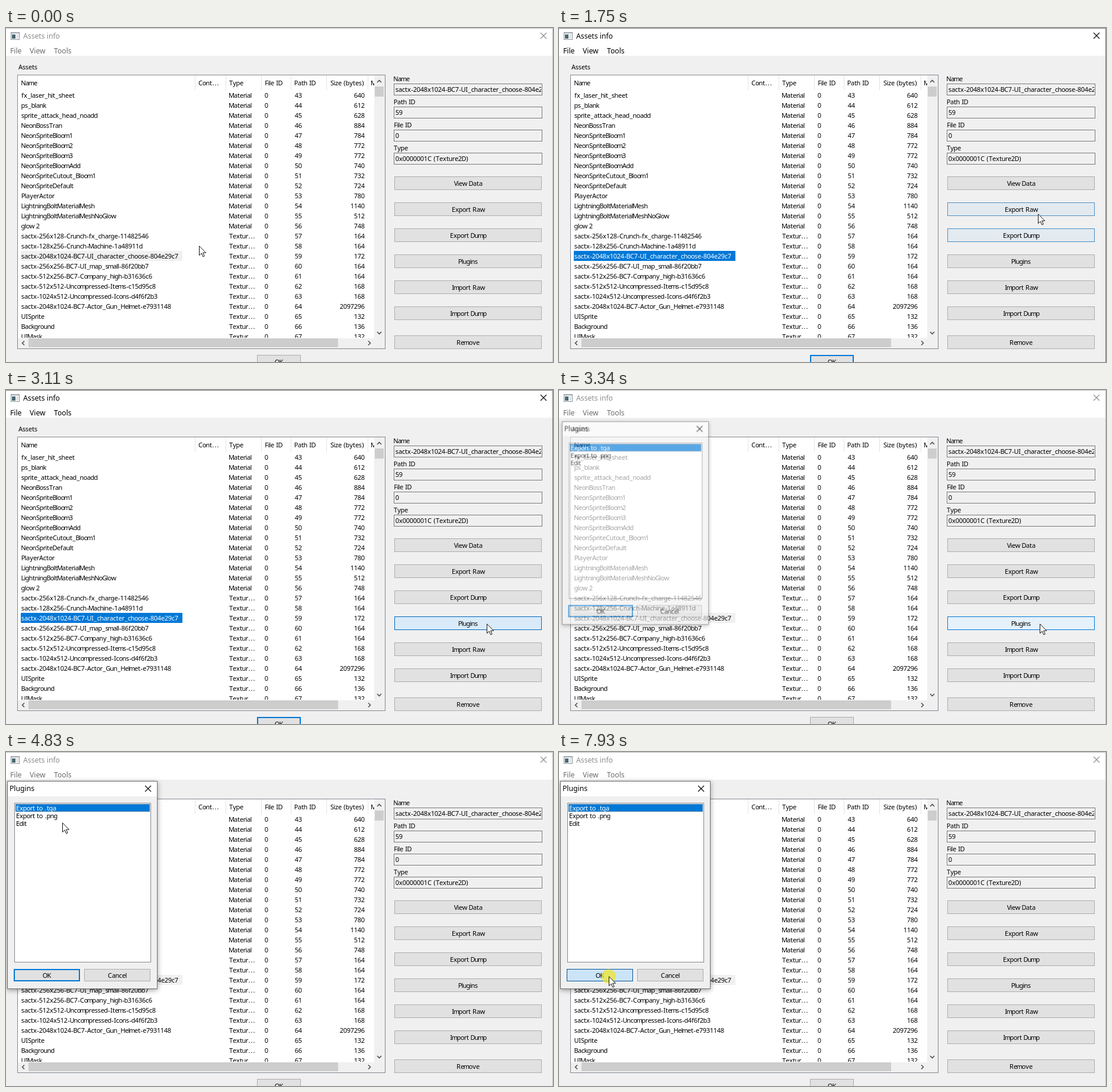
An HTML page for the animation above (8 s loop, 924 by 565 pixels).

```html
<!DOCTYPE html>
<html lang="en">
<head>
<meta charset="utf-8">
<title>Assets info</title>
<style>
  html, body { margin: 0; width: 100%; height: 100%; overflow: hidden; background: #f0f0f0; }
  svg { display: block; width: 924px; height: 565px; }
  text { font: 11px "Noto Sans", "Open Sans", sans-serif; font-variant-ligatures: none; fill: #000; white-space: pre; }
  .ui { text-anchor: middle; }
  .title { font-size: 12.2px; }
  .dialog { transform-origin: 128.5px 225px; filter: drop-shadow(0 2px 4px rgba(0, 0, 0, .38)); }
</style>
</head>
<body>
<script>
const LOOP = 8000;
const NS = 'http://www.w3.org/2000/svg';
const BLUE = '#0078d7';

function add(parent, tag, attrs = {}, content) {
  const el = document.createElementNS(NS, tag);
  for (const key in attrs) el.setAttribute(key, attrs[key]);
  if (content !== undefined) el.textContent = content;
  parent.append(el);
  return el;
}

const fillRect = (parent, x, y, width, height, fill) =>
  add(parent, 'rect', { x, y, width, height, fill });

const box = (parent, x, y, w, h, fill, stroke, line = 1) =>
  add(parent, 'rect', {
    x: x + line / 2, y: y + line / 2, width: w - line, height: h - line,
    fill, stroke, 'stroke-width': line
  });

const stroke = (parent, d, color, width = 1) =>
  add(parent, 'path', { d, fill: 'none', stroke: color, 'stroke-width': width });

// Whole-pixel advances of the interface font; everything else is 6.
const advances = { 2: 'il', 3: ' j', 4: 'frtI-().', 5: 'ckszJL', 7: 'ACDGHNRU', 8: 'mwMOQ', 10: 'W' };
const advance = ch => +(Object.keys(advances).find(w => advances[w].includes(ch)) || 6);
const measure = str => [...str].reduce((sum, ch) => sum + advance(ch), 0);

// align: 0 = left, .5 = centre, 1 = right
function label(parent, x, y, str, align = 0) {
  let pen = Math.round(x - measure(str) * align);
  const xs = [...str].map(ch => {
    const w = advance(ch);
    pen += w;
    return pen - w / 2;
  });
  return add(parent, 'text', { class: 'ui', x: xs.join(' '), y }, str);
}

const heading = (parent, x, y, str) => add(parent, 'text', { class: 'title', x, y }, str);

const cross = (parent, x, y, r) =>
  stroke(parent, `M${x - r} ${y - r}L${x + r} ${y + r}M${x + r} ${y - r}L${x - r} ${y + r}`, '#000', 1.1);

function button(parent, x, y, w, h, str) {
  const face = box(parent, x, y, w, h, '#e1e1e1', '#adadad');
  label(parent, x + w / 2, y + h / 2 + 4.5, str, .5);
  return face;
}

function tween(el, keys, easing = 'linear') {
  const all = [[0, keys[0][1]], ...keys, [LOOP, keys[keys.length - 1][1]]];
  el.animate(all.map(([t, style, ease]) => ({ offset: t / LOOP, easing: ease || easing, ...style })),
    { duration: LOOP, iterations: Infinity });
}
const jump = (el, keys) => tween(el, keys, 'steps(1, end)');

const svg = add(document.body, 'svg', { viewBox: '0 0 924 565', width: 924, height: 565 });
const defs = add(svg, 'defs');
function clip(id, x, y, w, h) {
  fillRect(add(defs, 'clipPath', { id }), x, y, w, h, '#000');
  return add(svg, 'g', { 'clip-path': `url(#${id})` });
}

// The main window has focus between these two moments.
const FOCUS = 490, BLUR = 3200;
const focus = (el, prop, on, off) =>
  jump(el, [[0, { [prop]: off }], [FOCUS, { [prop]: on }], [BLUR, { [prop]: off }]]);

// Title bar and menu
fillRect(svg, 0, 0, 924, 565, '#f0f0f0');
fillRect(svg, 0, 0, 924, 47, '#fff');
box(svg, 8, 7, 15, 13, '#fff', '#8b9299');
fillRect(svg, 9, 8, 13, 2, '#c9d0d6');
fillRect(svg, 10, 11, 6, 7, '#47686f');
fillRect(svg, 17, 11, 4, 7, '#dfe3e6');
focus(heading(svg, 29, 18, 'Assets info'), 'fill', '#000', '#8c8c8c');
[[7, 'File'], [40, 'View'], [81, 'Tools']].forEach(([x, str]) =>
  focus(heading(svg, x, 43, str), 'fill', '#000', '#6d6d6d'));
focus(cross(svg, 908, 13, 5), 'stroke', '#000', '#8c8c8c');
focus(stroke(svg, 'M0 .5H923.5V565', '#bcbcbc'), 'stroke', '#7a7a7a', '#bcbcbc');

// Asset list
label(svg, 21, 70, 'Assets');
box(svg, 19, 79, 622, 464, '#fff', '#828790');
const list = clip('list', 20, 80, 602, 444);
[[26, 'Name'], [325, 'Cont...'], [377, 'Type'], [437, 'File ID'], [487, 'Path ID'], [548, 'Size (bytes)'], [617, 'M']]
  .forEach(([x, str]) => label(list, x, 97, str));
[319, 371, 431, 481, 541, 611].forEach(x => fillRect(list, x, 80, 1, 25, '#e3e3e3'));

const assets = `fx_laser_hit_sheet 640
ps_blank 612
sprite_attack_head_noadd 628
NeonBossTran 884
NeonSpriteBloom1 784
NeonSpriteBloom2 772
NeonSpriteBloom3 772
NeonSpriteBloomAdd 740
NeonSpriteCutout_Bloom1 732
NeonSpriteDefault 724
PlayerActor 780
LightningBoltMaterialMesh 1140
LightningBoltMaterialMeshNoGlow 512
glow 2 748
sactx-256x128-Crunch-fx_charge-11482546 164
sactx-128x256-Crunch-Machine-1a48911d 164
sactx-2048x1024-BC7-UI_character_choose-804e29c7 172
sactx-256x256-BC7-UI_map_small-86f20bb7 164
sactx-512x256-BC7-Company_high-b31636c6 164
sactx-512x512-Uncompressed-Items-c15d95c8 168
sactx-1024x512-Uncompressed-Icons-d4f6f2b3 168
sactx-2048x1024-BC7-Actor_Gun_Helmet-e7931148 2097296
UISprite 132
Background 136
UIMask 132`.split('\n');
const PICKED = 16;

assets.forEach((line, i) => {
  const cut = line.lastIndexOf(' ');
  const y = 118 + 17 * i;
  if (i === PICKED) focus(fillRect(list, 25, y - 13, 273, 17, '#f0f0f0'), 'fill', BLUE, '#f0f0f0');
  const name = label(list, 26, y, line.slice(0, cut));
  if (i === PICKED) focus(name, 'fill', '#fff', '#000');
  label(list, 377, y, i < 14 ? 'Material' : 'Textur...');
  label(list, 437, y, '0');
  label(list, 488, y, String(43 + i));
  label(list, 606, y, line.slice(cut + 1), 1);
});

// Scroll bars
fillRect(svg, 622, 80, 18, 462, '#f0f0f0');
fillRect(svg, 20, 525, 620, 17, '#f0f0f0');
fillRect(svg, 623, 99, 15, 17, '#cdcdcd');
fillRect(svg, 38, 525, 523, 15, '#cdcdcd');
['M627 92l3.5-3.5 3.5 3.5', 'M627 514l3.5 3.5 3.5-3.5', 'M31 529.5l-3.5 3.5 3.5 3.5', 'M612 529.5l3.5 3.5-3.5 3.5']
  .forEach(d => stroke(svg, d, '#505050', 1.6));

// Details
const picked = assets[PICKED].split(' ')[0];
[['Name', picked], ['Path ID', '59'], ['File ID', '0'], ['Type', '0x0000001C (Texture2D)']]
  .forEach(([name, value], i) => {
    const y = 39 * i;
    label(svg, 655, 90 + y, name);
    box(svg, 655, 94 + y, 251, 20, '#f0f0f0', '#7a7a7a');
    label(clip('field' + i, 656, 95 + y, 248, 18), 658, 108 + y, value);
  });

const faces = {};
['View Data', 'Export Raw', 'Export Dump', 'Plugins', 'Import Raw', 'Import Dump', 'Remove']
  .forEach((str, i) => { faces[str] = button(svg, 656, i < 6 ? 251 + 44 * i : 520, 249, 23, str); });

const rest = { fill: '#e1e1e1', stroke: '#adadad' };
const hover = { fill: '#e5f1fb', stroke: BLUE };
const press = { fill: '#cce4f7', stroke: '#005499' };
tween(faces['Export Raw'], [[1600, rest], [1880, hover], [2150, hover], [2500, rest]]);
tween(faces['Export Dump'], [[1250, rest], [1450, hover], [1590, hover], [1980, rest],
  [2300, rest], [2480, hover], [2640, hover], [2930, rest]]);
tween(faces.Plugins, [[2760, rest], [2930, hover], [2960, hover], [2960, press], [3060, press],
  [3160, hover], [3400, hover], [3740, rest]]);

box(svg, 424, 553, 74, 23, '#e1e1e1', '#adadad');
focus(box(svg, 424, 553, 74, 23, 'none', BLUE, 2), 'opacity', 1, 0);
label(svg, 461, 569, 'OK', .5);

// Plugins dialog
const dialog = add(svg, 'g', { class: 'dialog' });
box(dialog, 2, 49, 254, 352, '#f0f0f0', '#6f6f6f');
fillRect(dialog, 3, 50, 252, 25, '#fff');
heading(dialog, 6, 66, 'Plugins');
cross(dialog, 240, 62, 5);
box(dialog, 14, 86, 231, 270, '#fff', '#828790');

const TO_PNG = 5340, TO_TGA = 6460;
const choice = add(dialog, 'g');
fillRect(choice, 16, 88, 227, 13, BLUE);
add(choice, 'rect', {
  x: 16.5, y: 88.5, width: 226, height: 12, fill: 'none',
  stroke: '#ff8728', 'stroke-dasharray': '1 1', 'stroke-opacity': .5
});
const choose = (el, prop, tga, png) =>
  jump(el, [[0, { [prop]: tga }], [TO_PNG, { [prop]: png }], [TO_TGA, { [prop]: tga }]]);
choose(choice, 'transform', 'translate(0px, 0px)', 'translate(0px, 13px)');
choose(label(dialog, 17, 99, 'Export to .tga'), 'fill', '#fff', '#000');
choose(label(dialog, 17, 112, 'Export to .png'), 'fill', '#000', '#fff');
label(dialog, 17, 125, 'Edit');

const okFace = button(dialog, 13, 367, 112, 21, 'OK');
const okRing = box(dialog, 13, 367, 112, 21, 'none', BLUE, 2);
button(dialog, 132, 367, 112, 21, 'Cancel');
tween(okFace, [[7340, rest], [7520, hover], [7930, hover], [7930, press]]);
tween(okRing, [[7340, { opacity: 1 }], [7520, { opacity: 0 }]]);

const pose = (opacity, scale) => ({ opacity, transform: `scale(${scale})` });
tween(dialog, [[3240, pose(0, .93)], [3340, pose(.65, .977)], [3480, pose(1, 1)]]);

// Pointer with click marker
const pointer = add(svg, 'g');
const marker = add(pointer, 'circle', { cx: 0, cy: .5, r: 12, fill: '#eee428', 'fill-opacity': .72 });
add(pointer, 'path', {
  d: 'M.5.8V16.6L4.2 13.1 6.8 18.9 9.2 17.8 6.6 12.2H11.6Z',
  fill: '#fff', stroke: '#111', 'stroke-width': 1
});

const at = (t, x, y, ease) => [t, { transform: `translate(${x}px, ${y}px)` }, ease];
tween(pointer, [
  at(29, 326, 368), at(30, 314, 370), at(180, 255, 381), at(660, 255, 381, 'ease-in-out'),
  at(1490, 812, 347), at(1520, 812, 346), at(1660, 809, 314), at(2110, 809, 314),
  at(2300, 810, 340), at(2650, 809, 364), at(2800, 811, 380), at(2930, 812, 395),
  at(3390, 812, 395, 'ease-in-out'), at(3750, 245, 207), at(3780, 245, 207, 'ease-out'),
  at(3950, 149, 179), at(4150, 149, 179, 'ease-in-out'), at(4830, 95, 119), at(4960, 91, 114),
  at(5010, 91, 113), at(5159, 91, 113), at(5160, 89, 106), at(5780, 89, 106),
  at(5900, 97, 95), at(6690, 97, 95, 'ease-in'), at(7050, 121, 210), at(7380, 100, 355, 'ease-out'),
  at(7520, 80, 379), at(7680, 80, 379), at(7750, 84, 379)
]);

const clicks = [[490, 530], [2960, 3060], [5340, 5440], [6460, 6540], [7930, LOOP]];
jump(marker, [[0, { opacity: 0 }], ...clicks.flatMap(([down, up]) =>
  [[down, { opacity: 1 }], [up, { opacity: 0 }]])]);
</script>
</body>
</html>
```
